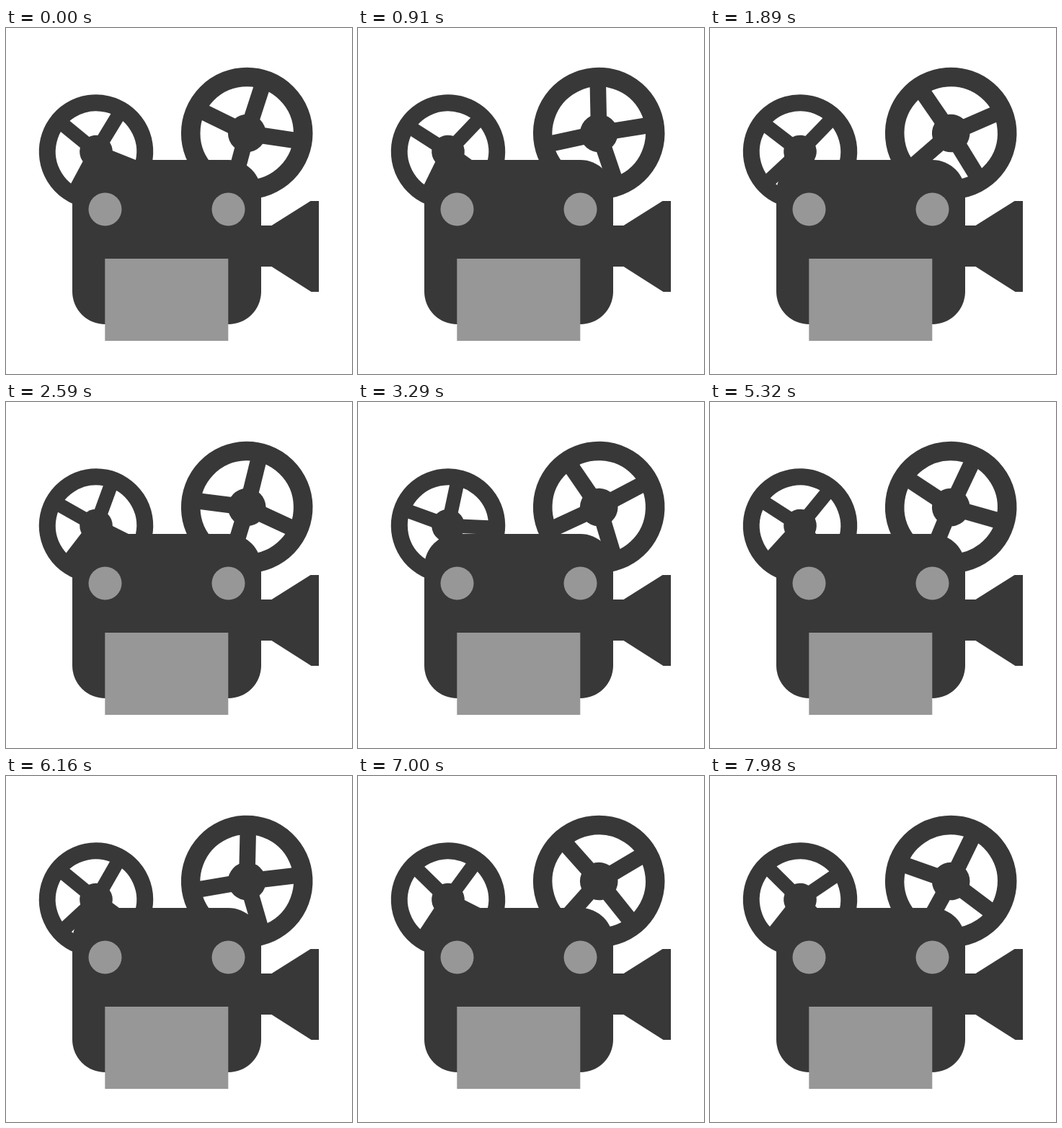
An HTML page with a canvas for the animation above (8 s loop, 480x480 px).

```html
<!DOCTYPE html>
<html>
<head>
<meta charset="utf-8">
<style>
html, body { margin: 0; width: 100%; height: 100%; overflow: hidden; background: #fff; }
canvas { display: block; width: 480px; height: 480px; }
</style>
</head>
<body>
<canvas id="stage" width="480" height="480"></canvas>
<script>
const ctx = document.getElementById('stage').getContext('2d');
const DARK = '#383838', GREY = '#979797';
const LOOP = 8000, STEP = 70;
const SPOKES = [8.5, -72, -154, 105]; // uneven spacing, in degrees

function disc(x, y, r, color) {
  ctx.fillStyle = color;
  ctx.beginPath();
  ctx.arc(x, y, r, 0, Math.PI * 2);
  ctx.fill();
}

function reel(x, y, scale, degrees) {
  ctx.save();
  ctx.translate(x, y);
  ctx.scale(scale, scale);
  ctx.rotate(degrees * Math.PI / 180);
  ctx.strokeStyle = DARK;
  ctx.lineWidth = 26.6;
  ctx.beginPath();
  ctx.arc(0, 0, 78, 0, Math.PI * 2);
  ctx.stroke();
  ctx.lineWidth = 22.5;
  for (const spoke of SPOKES) {
    const a = spoke * Math.PI / 180;
    ctx.beginPath();
    ctx.moveTo(0, 0);
    ctx.lineTo(72 * Math.cos(a), 72 * Math.sin(a));
    ctx.stroke();
  }
  disc(0, 0, 26.3, DARK);
  ctx.restore();
}

function camera() {
  ctx.fillStyle = DARK;
  ctx.beginPath();
  ctx.roundRect(92, 183, 262, 228, 45.5);
  ctx.fill();

  ctx.beginPath();
  ctx.moveTo(350, 274);
  ctx.lineTo(368.5, 274);
  ctx.lineTo(422.5, 240);
  ctx.lineTo(434, 240);
  ctx.lineTo(434, 366);
  ctx.lineTo(423.5, 366);
  ctx.lineTo(368.5, 331);
  ctx.lineTo(350, 331);
  ctx.fill();

  disc(137.5, 251.5, 23, GREY);
  disc(308.5, 251.5, 23, GREY);
  ctx.fillRect(137.3, 320, 171, 114);
}

function draw(now) {
  const step = Math.floor((now % LOOP) / STEP);
  ctx.fillStyle = '#fff';
  ctx.fillRect(0, 0, 480, 480);
  reel(125, 171.5, 0.868, 13.3 + step * 7.25);
  reel(334.2, 146, 1, step * 4.833);
  camera();
}

const start = performance.now();
function tick() {
  draw(performance.now() - start);
  requestAnimationFrame(tick);
}
tick();
</script>
</body>
</html>
```
